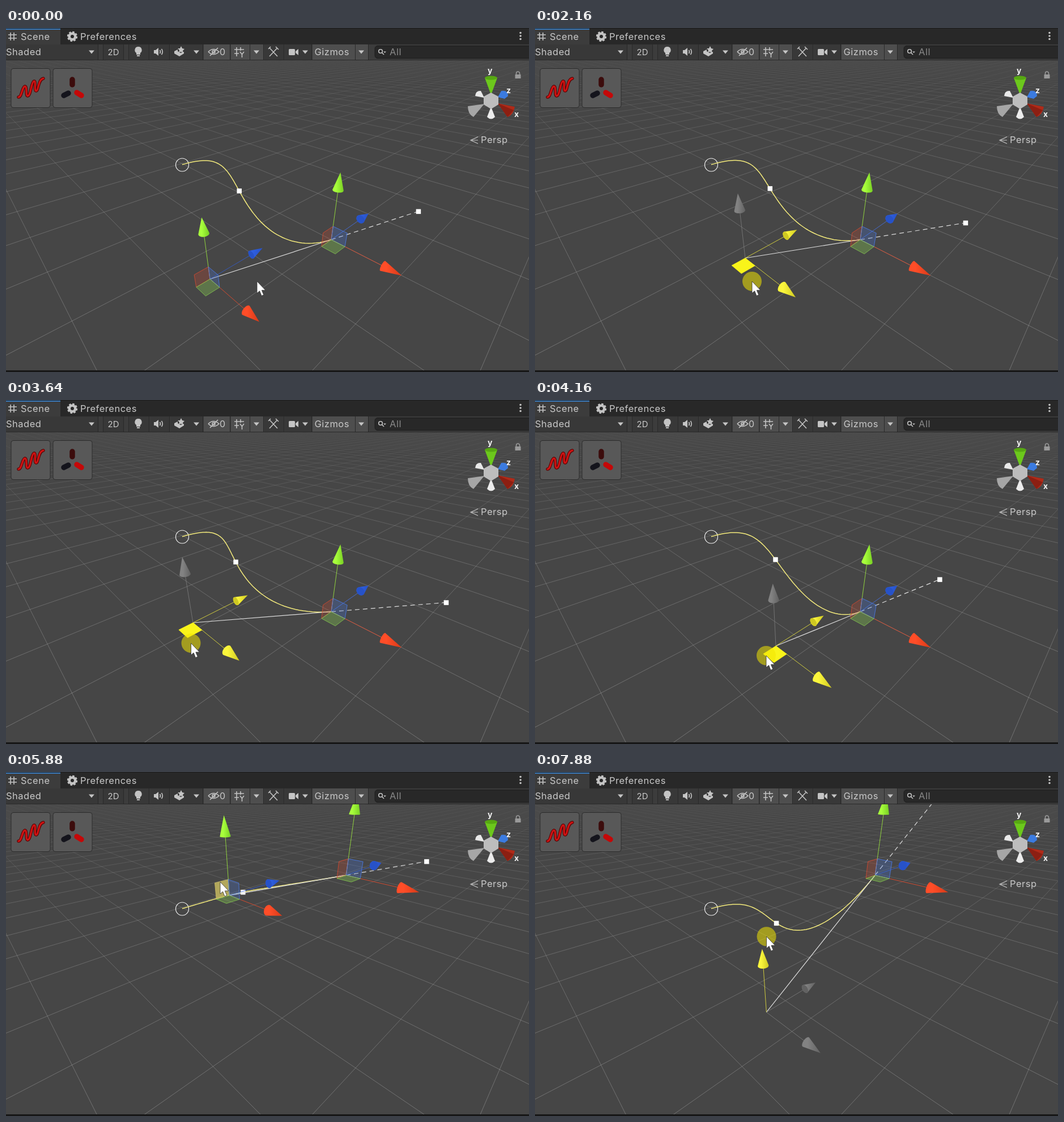
Write an HTML page that moves like this. It is 923 by 607 pixels and loops after 8 s.

```html
<!DOCTYPE html>
<html lang="en">
<head>
<meta charset="utf-8">
<title>Scene view</title>
<style>
html, body { margin: 0; width: 100%; height: 100%; overflow: hidden; background: #464646; }
svg { display: block; width: 923px; height: 607px; }
text { font: 16.5px Inter, sans-serif; letter-spacing: .5px; fill: #c8c8c8; }
.lbl { font: bold 14px Inter, sans-serif; fill: #f4f4f4; }
.ico { fill: #c4c4c4; }
.ln { fill: none; stroke: #c4c4c4; stroke-width: 1.6; }
</style>
</head>
<body>
<svg viewBox="0 0 923 607" xmlns="http://www.w3.org/2000/svg">
  <defs id="defs">
    <clipPath id="view"><rect y="57" width="923" height="547"/></clipPath>
    <linearGradient id="fade" gradientUnits="userSpaceOnUse" x1="0" y1="57" x2="0" y2="604">
      <stop offset="0" stop-color="#b4b4b4" stop-opacity=".04"/>
      <stop offset=".12" stop-color="#b4b4b4" stop-opacity=".13"/>
      <stop offset=".4" stop-color="#b4b4b4" stop-opacity=".3"/>
      <stop offset="1" stop-color="#b4b4b4" stop-opacity=".4"/>
    </linearGradient>
  </defs>
  <rect width="923" height="607" fill="#464646"/>
  <g clip-path="url(#view)">
    <path id="grid" fill="none" stroke="url(#fade)"/>
    <g id="scene"></g>
  </g>

  <!-- tool buttons -->
  <g fill="#585858" stroke="#2c2c2c">
    <rect x="9" y="71.500" width="69" height="69" rx="4"/>
    <rect x="83" y="71.500" width="69" height="69" rx="4"/>
  </g>
  <g fill="none" stroke-linecap="round" stroke-linejoin="round">
    <g id="coil"></g>
    <g stroke-width="9.500">
      <path stroke="#3c0c0c" d="M117 91V100"/>
      <path stroke="#14141c" d="M102 119L110 115"/>
      <path stroke="#c40808" d="M125 114L133 119"/>
    </g>
  </g>

  <!-- orientation gizmo -->
  <path d="M844 123L838 111Q829 110 828 120Z" fill="#e8e8e8"/>
  <path d="M868 122L874 111Q886 109 886 120L880 125Z" fill="#3b7be0"/>
  <path d="M844 134L815 138Q815 152 825 157Z" fill="#a6a6a6"/>
  <path d="M868 133L898 139Q895 154 885 157Z" fill="#b02a18"/>
  <path d="M868 133L896 145L885 157Z" fill="#8c1f12"/>
  <path d="M856 139L849 157Q856 164 863 157Z" fill="#ececec"/>
  <path d="M856 118L845 88Q856 82 867 88Z" fill="#6cc81c"/>
  <ellipse cx="856" cy="88" rx="11" ry="3.500" fill="#57a812"/>
  <path d="M856 114L869 121V135L856 143L843 135V121Z" fill="#bdbdbd"/>
  <text class="lbl" x="850" y="80">y</text>
  <text class="lbl" x="883" y="115">z</text>
  <text class="lbl" x="897" y="157">x</text>
  <rect x="898.500" y="82" width="10" height="7" fill="#9a9a9a"/>
  <path d="M900.500 82V80A3 3 0 0 1 906.500 80V82" class="ln" style="stroke:#9a9a9a"/>
  <path class="ln" style="stroke-width:1.200" d="M833 192L820 198L833 204M822 198H833"/>
  <text x="838" y="203">Persp</text>

  <!-- tab bar -->
  <rect width="923" height="30" fill="#282828"/>
  <rect width="96" height="30" fill="#3c3c3c"/>
  <rect width="923" height="1" fill="#1c1c1c"/>
  <rect y="1" width="96" height="2" fill="#3a79bb"/>
  <path class="ln" d="M8 8V22M14 8V22M4 12H19M4 18H19"/>
  <text x="26" y="21">Scene</text>
  <circle cx="117" cy="15" r="5.300" fill="none" stroke="#c4c4c4" stroke-width="4.600"/>
  <circle cx="117" cy="15" r="8" fill="none" stroke="#c4c4c4" stroke-width="2.400" stroke-dasharray="3.600 2.680"/>
  <text x="131" y="21">Preferences</text>
  <g class="ico"><circle cx="908" cy="8.500" r="1.800"/><circle cx="908" cy="14" r="1.800"/><circle cx="908" cy="19.500" r="1.800"/></g>

  <!-- toolbar -->
  <rect y="29" width="923" height="28" fill="#3c3c3c"/>
  <g id="cells"></g>
  <g id="carets" class="ico"></g>
  <text x="0" y="48">Shaded</text>
  <text x="179.500" y="48" style="font-size:15px;letter-spacing:0">2D</text>
  <text x="377" y="48" style="font-size:16px">0</text>
  <text x="544.500" y="48">Gizmos</text>
  <g class="ico">
    <path d="M233.500 33A6 6 0 0 1 237 44V47H230V44A6 6 0 0 1 233.500 33ZM231 48H236V50H231Z"/>
    <path d="M261 39H264L269 35V49L264 45H261Z"/>
    <path d="M309 32L311 36L315 37L312 40L312.500 44L309 42L305 43L306 39L303 36L307 36ZM297 41L303 38V41L308 44L314 42V45L306 50L297 45Z"/>
    <rect x="499" y="37" width="11" height="11" rx="1.500"/><path d="M511 41L516 37V48L511 44Z"/>
  </g>
  <g class="ln">
    <path d="M271.500 39Q273.500 42 271.500 45M274.500 37Q278 42 274.500 47"/>
    <path d="M357 42Q366 33 376 42Q366 51 357 42M360 49L374 35"/><circle cx="366.500" cy="42" r="2.500"/>
    <path d="M407 34V50M414 34V40M403 38H420M403 45H411M413 42L416.500 46.500L420 42M416.500 46.500V52"/>
    <path d="M465 35L479 50M479 35L465 50M463 37L467 33M476 33L481 38"/>
  </g>
  <rect x="651" y="31.500" width="280" height="22" rx="5" fill="#282828" stroke="#1c1c1c"/>
  <circle cx="661" cy="41" r="3.300" class="ln"/><path class="ln" d="M663.500 43.500L667 47"/>
  <path class="ico" d="M666 41.500H671L668.500 44Z"/>
  <text x="677" y="48" style="fill:#8a8a8a">All</text>
  <rect y="604" width="923" height="3" fill="#171717"/>
  <g id="mouse"></g>
</svg>
<script>
const $ = id => document.getElementById(id);
const LOOP = 8000, CX = 461.5, CY = 330, F = 525, HORIZON = 11;
const TILT = Math.atan((CY - HORIZON) / F), COS = Math.cos(TILT), SIN = Math.sin(TILT);
const AXES = { x: [.698, 0, -.716], y: [0, 1, 0], z: [.716, 0, .698] };

// World points are [right, height, forward]; the camera sits at height 1.
const add = (a, b, k = 1) => a.map((v, i) => v + b[i] * k);
const dot = (a, b) => a.reduce((s, v, i) => s + v * b[i], 0);
const dist = (a, b) => Math.hypot(...add(a, b, -1));
const depth = p => p[2] * COS + (1 - p[1]) * SIN;
function proj(p) {
  const z = depth(p);
  return [CX + F * p[0] / z, CY - F * (p[2] * SIN - (1 - p[1]) * COS) / z];
}
function ground(x, y) {
  const z = F / (COS * (y - HORIZON));
  return [(x - CX) / F * z, 0, z * (COS - (y - CY) / F * SIN)];
}

// Smooth track through [time, value...] keys without overshoot.
function track(keys, t) {
  const n = keys.length - 1;
  if (t <= keys[0][0]) return keys[0].slice(1);
  if (t >= keys[n][0]) return keys[n].slice(1);
  let i = 0;
  while (keys[i + 1][0] < t) i++;
  const slope = (j, c) => (keys[j + 1][c] - keys[j][c]) / (keys[j + 1][0] - keys[j][0]);
  const tan = (j, c) => {
    if (j < 1 || j >= n) return 0;
    const a = slope(j - 1, c), b = slope(j, c);
    return a * b <= 0 ? 0 : 2 * a * b / (a + b);
  };
  const a = keys[i], b = keys[i + 1], d = b[0] - a[0], u = (t - a[0]) / d, v = 1 - u;
  return a.slice(1).map((p, k) => {
    const c = k + 1;
    return p * v * v * (1 + 2 * u) + b[c] * u * u * (3 - 2 * u) + d * u * v * (tan(i, c) * v - tan(i + 1, c) * u);
  });
}

const START = ground(311, 241), ANCHOR = ground(574, 373.5);
const OUT = add(START, AXES.z, .8);
const handleKeys = [[1280, 360, 443], [1500, 345, 378], [1760, 339, 331], [1880, 341, 335], [2000, 348, 351],
  [2160, 371, 406], [2280, 392, 431], [2560, 505, 474], [2800, 582, 490], [2920, 582, 490], [3080, 570, 482],
  [3200, 561, 484], [3320, 492, 456], [3480, 385, 412], [3640, 330, 393], [3720, 332, 405], [3920, 370, 442],
  [4060, 424, 438], [4160, 425, 434], [4280, 417, 435], [4440, 409, 432]];
const liftKeys = [[4940, 0], [5300, .617]];
const dropKeys = [[6380, .617], [6700, .2], [7000, -.03], [7120, -.04], [7440, -.12], [7780, -.12], [7880, .03], [7960, .075]];
const moveA = [[120, 443, 447], [300, 418, 429], [460, 392, 430], [640, 356, 445], [720, 345, 446], [840, 351, 459]];
const moveB = [[4480, 400, 448], [4660, 480, 380], [4840, 589, 271]];
const moveC = [[5480, 617, 80], [5640, 540, 200], [5760, 440, 258], [5880, 378, 194], [5980, 366, 165], [6120, 382, 110], [6260, 391, 96]];

const anchorAt = t => add(ANCHOR, AXES.y, track(liftKeys, t)[0]);
function handleAt(t) {
  const p = ground(...track(handleKeys, t));
  p[1] = track(t < 6320 ? liftKeys : dropKeys, t)[0];
  return p;
}
function cursorAt(t) {
  if (t < 1160) return track(moveA, t);
  if (t < 4480) return add(proj(handleAt(t + 120)), [-9, 16]);
  if (t < 4900) return track(moveB, t);
  if (t < 5480) return add(proj(anchorAt(t + 60)), [15, -102]);
  if (t < 6320) return track(moveC, t);
  return add(proj(handleAt(t + 60)), [1, -122]);
}

const COLORS = {
  x: ['#ff4d28', '#d63a18'], y: ['#a8ff3c', '#78cf24'], z: ['#2f5fe0', '#2752c8'],
  on: ['#fbf63c', '#cfc922'], off: ['#828282', '#626262'], hover: ['#d6d48c', '#a8a660']
};
for (const k in COLORS) $('defs').innerHTML += `<linearGradient id="c-${k}"><stop offset=".3" stop-color="${COLORS[k][0]}"/><stop offset="1" stop-color="${COLORS[k][1]}"/></linearGradient>`;

const pts = list => 'M' + list.map(p => p[0].toFixed(1) + ' ' + p[1].toFixed(1)).join('L');
const line = (a, b, color, extra = '') => `<path d="${pts([a, b])}" fill="none" stroke="${color}" ${extra}/>`;
const box = p => `<rect x="${p[0] - 4}" y="${p[1] - 4}" width="8.500" height="8.500" fill="#fff"/>`;

function hull(list) {
  const s = [...list].sort((a, b) => a[0] - b[0] || a[1] - b[1]);
  const half = arr => arr.reduce((h, p) => {
    while (h.length > 1) {
      const [a, b] = h.slice(-2);
      if ((b[0] - a[0]) * (p[1] - a[1]) - (b[1] - a[1]) * (p[0] - a[0]) > 0) break;
      h.pop();
    }
    return [...h, p];
  }, []).slice(0, -1);
  return [...half(s), ...half(s.reverse())];
}

function arrow(p, axis, len, look) {
  const u = AXES[axis], [v, w] = Object.keys(AXES).filter(k => k !== axis).map(k => AXES[k]);
  const base = add(p, u, len * .76), r = len * .068, ring = [];
  for (let i = 0; i < 20; i++) {
    const a = i * Math.PI / 10;
    ring.push(proj(add(add(base, v, r * Math.cos(a)), w, r * Math.sin(a))));
  }
  let s = line(proj(p), proj(base), COLORS[look][0], 'stroke-opacity=".75"');
  s += `<path d="${pts(hull([...ring, proj(add(p, u, len))]))}Z" fill="url(#c-${look})"/>`;
  if (dot(add([0, 1, 0], base, -1), u) < 0) s += `<path d="${pts(ring)}Z" fill="${COLORS[look][1]}"/>`;
  return s;
}

function quad(p, a, b, color, alpha) {
  const c = [p, add(p, a), add(add(p, a), b), add(p, b)].map(proj);
  return `<path d="${pts(c)}Z" fill="${color}" fill-opacity="${alpha}" stroke="${color}" stroke-opacity=".8"/>`;
}

// drag: '', 'y' or 'plane'; hover: an axis, or an axis with "q" for its plane.
function gizmo(p, drag, hover) {
  const len = .2435 * depth(p), q = len * .22;
  const X = AXES.x.map(v => v * q), Y = AXES.y.map(v => v * q), Z = AXES.z.map(v => -v * q);
  const look = k => drag ? ((k === 'y') === (drag === 'y') ? 'on' : 'off') : hover === k ? 'hover' : k;
  let s = ['z', 'y', 'x'].map(k => arrow(p, k, len, look(k))).join('');
  if (drag === 'plane') s += quad(p, X, Z, '#f9f41a', 1);
  if (!drag) {
    const face = (k, a, b, color, alpha) => hover === k + 'q' ? quad(p, a, b, '#cdbf62', .8) : quad(p, a, b, color, alpha);
    s += face('x', Z, Y, '#db4a30', .24) + face('z', X, Y, '#4a7df0', .24) + face('y', X, Z, '#86c850', .36);
  }
  return s;
}

function curve(p, a) {
  const N = 80, list = [], run = [0];
  for (let i = 0; i <= N; i++) {
    const t = i / N, s = 1 - t;
    list.push(START.map((v, k) => v * s ** 3 + 3 * OUT[k] * s * s * t + 3 * p[k] * s * t * t + a[k] * t ** 3));
    if (i) run.push(run[i - 1] + dist(list[i], list[i - 1]));
  }
  const mid = run.findIndex(d => d >= run[N] / 2);
  const f = (run[N] / 2 - run[mid - 1]) / (run[mid] - run[mid - 1]);
  const node = add(list[mid - 1], add(list[mid], list[mid - 1], -1), f);
  return `<path d="${pts(list.map(proj))}" fill="none" stroke="#f3ea7c" stroke-width="1.500"/>` + box(proj(node));
}

// Which part lies under the pointer, as [from, to, part].
const handleHover = [[300, 480, 'z'], [680, 780, 'xq'], [780, 1160, 'yq'], [4480, 4520, 'yq'], [5840, 6000, 'xq'], [6080, 6320, 'y']];
const anchorHover = [[4800, 4900, 'y'], [5480, 5520, 'y']];
const pick = (list, t) => (list.find(h => t >= h[0] && t < h[1]) || [])[2];

function draw(time) {
  const t = Math.min(Math.floor(time / 40) * 40, 7880);
  const a = anchorAt(t), p = handleAt(t);
  const dragP = t >= 1160 && t < 4480 ? 'plane' : t >= 6320 ? 'y' : '';
  const dragA = t >= 4900 && t < 5480 ? 'y' : '';
  const reach = t < 4900 ? .708 : .561;
  const m = add(a, add(a, p, -1), reach / dist(a, p));
  const [sa, sp, sm] = [a, p, m].map(proj);
  $('scene').innerHTML =
    '<circle cx="311" cy="241.500" r="11.500" fill="none" stroke="#f0f0f0" stroke-width="1.200"/>' +
    curve(p, a) + line(sa, sp, '#dedede', 'stroke-width="1.200"') +
    line(sa, sm, '#dcdcdc', 'stroke-dasharray="8 6" stroke-width="1.200"') + box(sm) +
    gizmo(a, dragA, pick(anchorHover, t)) + gizmo(p, dragP, pick(handleHover, t));
  const [x, y] = cursorAt(t);
  const press = dragA || dragP ? '<circle r="17" fill="#f2e600" fill-opacity=".54"/>' : '';
  $('mouse').innerHTML = `<g transform="translate(${x.toFixed(1)} ${y.toFixed(1)})">${press}
    <path d="M0 0V21L4.600 17L8 25.500L11.800 24L8.400 15.800H15Z" fill="#fff" stroke="#333" stroke-width=".8"/></g>`;
}

function drawGrid() {
  const cell = .408, n = 44, near = .08;
  let d = '';
  const seg = (p, q) => {
    let a = depth(p), b = depth(q);
    if (a < near && b < near) return;
    if (a < near) p = add(p, add(q, p, -1), (near - a) / (b - a));
    else if (b < near) q = add(q, add(p, q, -1), (near - b) / (a - b));
    d += pts([proj(p), proj(q)]);
  };
  for (let i = -n; i <= n; i++) {
    for (const [u, v] of [[AXES.x, AXES.z], [AXES.z, AXES.x]]) {
      const o = add(ANCHOR, u, i * cell);
      seg(add(o, v, -n * cell), add(o, v, n * cell));
    }
  }
  $('grid').setAttribute('d', d);
}

function drawToolbar() {
  const cells = [[-2, 162, 0], [172, 207, 0], [217, 252, 0], [254, 288, 0], [290, 347, 0], [349, 395, 1],
    [397, 454, 1], [456, 490, 0], [492, 539, 0], [541, 639, 1]];
  $('cells').innerHTML = cells.map(([a, b, on]) =>
    `<rect x="${a}" y="29" width="${b - a}" height="27" fill="${on ? '#4e4e4e' : '#383838'}"/><path d="M${b + .5} 29V56" stroke="#282828"/>`).join('') +
    '<path d="M171.500 29V56M216.500 29V56M430.500 29V56M616.500 29V56M0 56.500H923" stroke="#2a2a2a"/>';
  $('carets').innerHTML = [151, 336, 442, 528, 627].map(x => `<path d="M${x - 5} 39.500H${x + 5}L${x} 45.500Z"/>`).join('');
  const coil = 'M22 122C28 122 28 105 33 103C38 102 34 119 38 120C44 120 44 97 49 94C54 92 49 110 53 111C58 111 56 91 66 89';
  $('coil').innerHTML = [['#5c0606', 5.4], ['#d01212', 3]].map(([c, w]) => `<path d="${coil}" stroke="${c}" stroke-width="${w}"/>`).join('');
}

drawGrid();
drawToolbar();
const begin = performance.now();
function tick() {
  draw((performance.now() - begin) % LOOP);
  requestAnimationFrame(tick);
}
tick();
</script>
</body>
</html>
```
